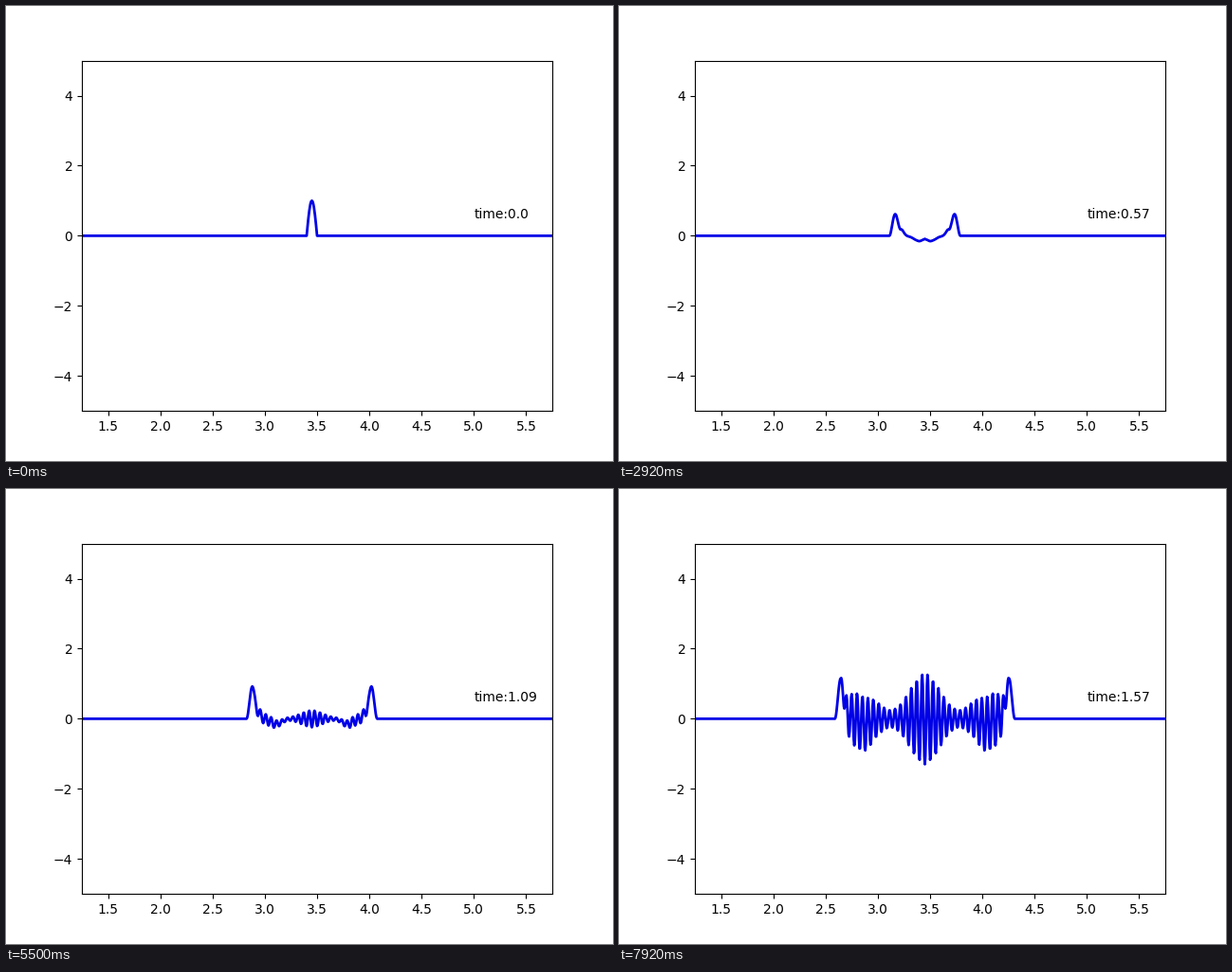
Write a matplotlib script that moves like this. It is 640 px wide and 480 px high and loops after 8 s.

```python
import numpy as np
import matplotlib.pyplot as plt
from matplotlib.animation import FuncAnimation

FRAMES = 240
LOOP_MS = 8000
DT = 0.005
CENTER = 3.45
WAVELENGTH = 0.0519   # of the standing ripple, in x
SWING = 24.5          # steps per swing of the ripple

# Way of the two fronts: distance from the centre and height at some steps
STEPS = [0, 84, 144, 194, 241, 281, 314]
DISTANCE = [0, 0.200, 0.368, 0.491, 0.645, 0.720, 0.805]
HEIGHT = [0.5, 0.65, 0.58, 0.90, 0.94, 0.82, 1.15]


def pulse(s, step):
    """Half sine that softens into a bell with time."""
    soft = min(1, step / 144)
    width = 0.05 + 0.006 * soft
    s = np.clip(s / width, -1, 1)
    return np.maximum(0, np.cos(np.pi / 2 * s)) ** (1 + soft)


def bell(s, width):
    return np.exp(-(s / width) ** 2)


def trail(r, d):
    """Shoulder and shallow trough that follow the front."""
    shape = 0.18 * bell(r - d + 0.06, 0.03) - 0.15 * bell(r - d + 0.23, 0.07)
    return min(1, d / 0.2) * shape


def ripple(r, d, step):
    """Growing standing wave between the fronts, with a beat in its envelope."""
    q = r / max(d, 0.01)
    growth = 1.4 * np.exp((step - STEPS[-1]) / 55)
    envelope = (0.62 + 0.38 * np.cos(2.5 * np.pi * q)) * (1 - 0.5 * q)
    edge = np.clip((d - r) / 0.06, 0, 1)
    swing = np.cos(2 * np.pi * (step - 242) / SWING)
    return -growth * envelope * edge * swing * np.cos(2 * np.pi * r / WAVELENGTH)


def wave(x, step):
    r = np.abs(x - CENTER)
    d = np.interp(step, STEPS, DISTANCE)
    h = np.interp(step, STEPS, HEIGHT)
    fronts = h * (pulse(r - d, step) + pulse(r + d, step))
    return fronts + trail(r, d) + ripple(r, d, step)


fig, ax = plt.subplots(figsize=(6.4, 4.8), dpi=100)
ax.set_xlim(1.25, 5.75)
ax.set_ylim(-5, 5)
x = np.linspace(1.25, 5.75, 901)
line, = ax.plot(x, wave(x, 0), color="#0000e6", lw=2)
label = ax.text(5, 0.5, "time:0.0")


def update(frame):
    tick = (2 * frame + 1) // 5   # the picture changes 12 times a second
    step = max(0, (10 * tick - 6) // 3)
    line.set_ydata(wave(x, step))
    label.set_text(f"time:{round(step * DT, 3)}")
    return line, label


anim = FuncAnimation(fig, update, frames=FRAMES, interval=LOOP_MS / FRAMES,
                     repeat=True, repeat_delay=0)
plt.show()
```
